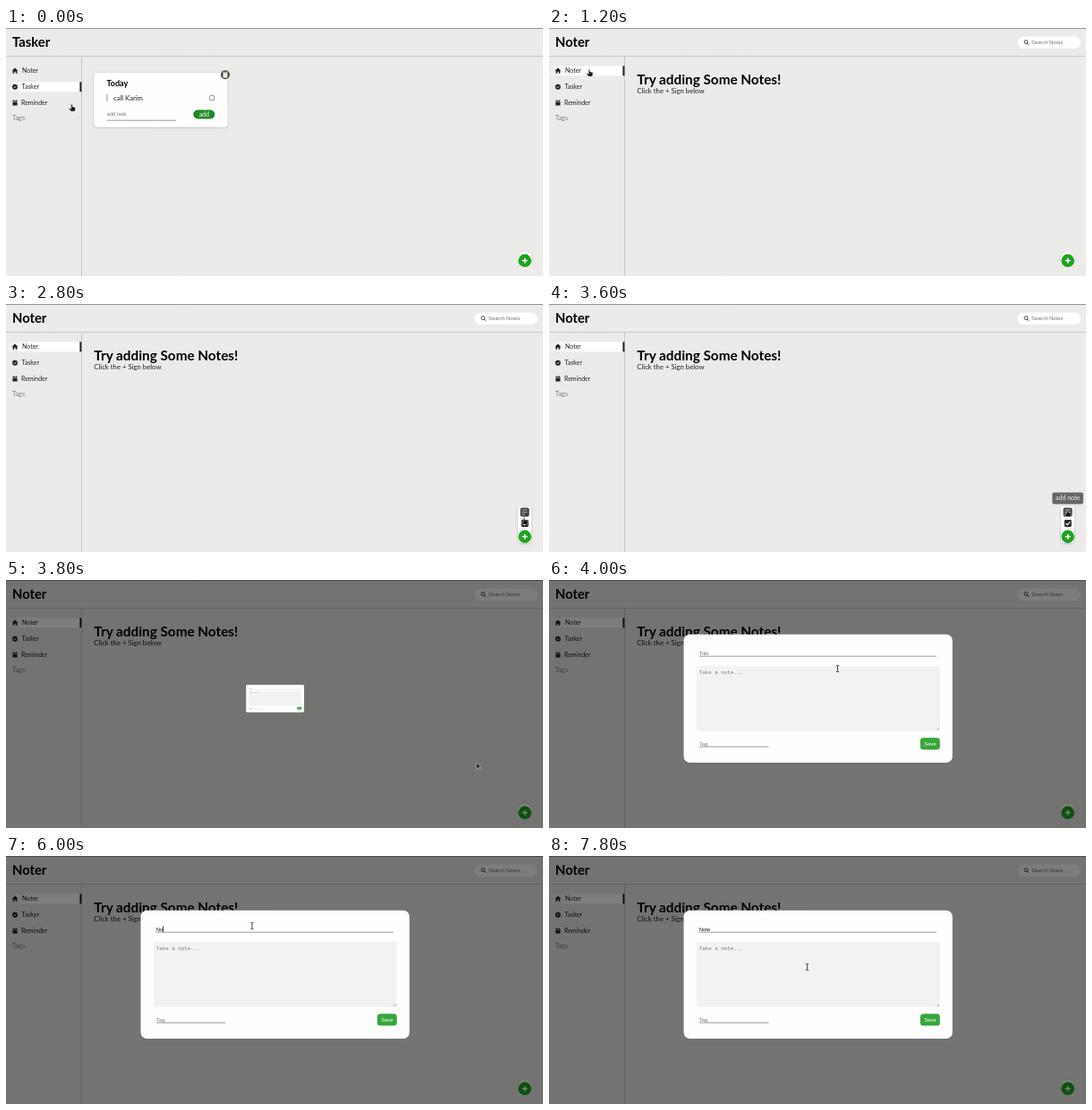
An HTML page that plays this animation: 600x277 px, repeating every 8 s.

```html
<!DOCTYPE html>
<html lang="en">
<head>
<meta charset="utf-8">
<title>Notes app</title>
<style>
  html, body { margin: 0; width: 100%; height: 100%; overflow: hidden; background: #ebebe9; }
  svg { display: block; width: 100%; height: 100%; }
  text { font: 7px Lato, sans-serif; fill: #222; white-space: pre; }
  .h1 { font-size: 14.8px; font-weight: 700; fill: #000; }
  .field { font: 5.83px "Liberation Sans", Arial, sans-serif; fill: #757575; }
  .mono { font: 5.83px "Liberation Mono", monospace; fill: #757575; }
  .light { fill: #fff; }
  .mid { text-anchor: middle; }
</style>
</head>
<body>
<svg viewBox="0 0 600 277">
  <defs>
    <linearGradient id="bg">
      <stop offset="0" stop-color="#e9ece9"/><stop offset=".5" stop-color="#ebebe9"/><stop offset="1" stop-color="#ecebe9"/>
    </linearGradient>
    <linearGradient id="row">
      <stop offset="0" stop-color="#fff" stop-opacity=".1"/><stop offset=".3" stop-color="#fff"/>
    </linearGradient>
    <filter id="shade" x="-30%" y="-30%" width="160%" height="160%">
      <feDropShadow dx="0" dy=".6" stdDeviation="1.2" flood-opacity=".25"/>
    </filter>
  </defs>

  <rect width="600" height="277" fill="url(#bg)"/>
  <rect width="600" height="1" fill="#929491"/>
  <path d="M0 31.5H600M84.5 31.5V277" stroke="#c9cac8"/>
  <text id="heading" class="h1" x="7" y="21"></text>

  <g id="active">
    <rect y="-5.5" width="83" height="11" fill="url(#row)"/>
    <rect x="82.4" y="-5.5" width="2" height="11" fill="#222"/>
  </g>
  <g fill="#222">
    <path d="M6.6 47.8L10 44.6 13.4 47.8H12.4V50.8H10.8V48.7H9.2V50.8H7.6V47.8Z"/>
    <circle cx="10" cy="65.7" r="3"/>
    <path d="M8.5 65.8L9.6 66.9 11.6 64.7" fill="none" stroke="#fff" stroke-width=".8"/>
    <path d="M7.4 81.2H8.2V80.3H9V81.2H11V80.3H11.8V81.2H12.6V82.3H7.4ZM7.4 82.8H12.6V86.4H7.4Z"/>
  </g>
  <text x="18" y="50.2">Noter</text>
  <text x="17.5" y="68.2">Tasker</text>
  <text x="17" y="86">Reminder</text>
  <text x="7" y="102.7" style="fill:#7b7c7a;font-size:7.3px">Tags</text>

  <g id="tasks">
    <rect x="98.5" y="50" width="149" height="60.5" rx="4" fill="#fefefd" filter="url(#shade)"/>
    <text x="112.5" y="64.6" style="font-size:9px;font-weight:700;fill:#000">Today</text>
    <path d="M113 74V82.5" stroke="#888" stroke-width=".9"/>
    <text x="120" y="80.6" style="font-size:7.7px">call Karim</text>
    <rect x="227.6" y="75.6" width="5" height="5" rx=".8" fill="#fff" stroke="#777" stroke-width=".8"/>
    <text class="field" x="112.5" y="98.2">add task</text>
    <path d="M112.5 103.2H190" stroke="#858585" stroke-width=".8"/>
    <rect x="209.3" y="91.6" width="24" height="9.8" rx="4.9" fill="#1f8b22"/>
    <text class="light mid" x="221.3" y="98.6">add</text>
    <circle cx="245" cy="52.3" r="5" fill="#484936"/>
    <path d="M242.9 50.2H247.1V55.2H242.9ZM242.4 49.3H247.6" fill="#f0efdc" stroke="#f0efdc" stroke-width=".7"/>
  </g>

  <g id="notes">
    <rect x="523.5" y="9.5" width="70.5" height="13.5" rx="6.75" fill="#fefefe"/>
    <circle cx="533" cy="15.6" r="1.9" fill="none" stroke="#333" stroke-width=".9"/>
    <path d="M534.4 17L536.2 18.8" stroke="#333"/>
    <text class="field" x="539" y="18.2">Search Notes</text>
    <text class="h1" x="98.3" y="63.2" style="font-size:15.3px">Try adding Some Notes!</text>
    <text x="98.3" y="73.2" style="font-size:7.75px">Click the + Sign below</text>
  </g>

  <g id="menu">
    <rect x="572" y="226" width="15" height="41" rx="4" fill="#fff" filter="url(#shade)"/>
    <rect x="574.6" y="227.6" width="10" height="10" rx="2" fill="#444"/>
    <path d="M576.5 230H582.5M576.5 232.5H582.5M576.5 235H580" stroke="#ddd" stroke-width=".7"/>
    <rect x="575.8" y="241" width="8" height="8" rx="1.4" fill="#2b2b2b"/>
    <path d="M577.4 245L579.2 246.8 582.2 243.3" fill="none" stroke="#fff" stroke-width="1.1"/>
  </g>
  <g id="tip">
    <rect x="562.3" y="210.6" width="34.6" height="13" rx="2" fill="#666"/>
    <text class="mid" x="579.6" y="219.2" style="fill:#f0f0f0">add note</text>
  </g>
  <circle cx="579.7" cy="257.2" r="7.7" fill="#fff" filter="url(#shade)"/>
  <circle cx="579.7" cy="259.8" r="7.2" fill="#1ba51b"/>
  <path d="M576.8 259.8H582.6M579.7 256.9V262.7" stroke="#fff" stroke-width="1.5"/>

  <rect id="dim" width="600" height="277" fill="#000" opacity=".51"/>
  <g id="modal">
    <rect x="150.5" y="60.8" width="300.3" height="143.2" rx="7" fill="#fefefd"/>
    <text id="title" class="field" x="167.8" y="83.7"></text>
    <path d="M168 85.2H433M168 186.2H245.5" stroke="#858585" stroke-width=".8"/>
    <rect x="164.8" y="96.2" width="272" height="72.6" rx="1" fill="#f2f2f0"/>
    <path d="M433.2 167.8L436 165M435 167.8L436 166.8" stroke="#777" stroke-width=".5"/>
    <text class="mono" x="167.8" y="104.6">Take a note...</text>
    <text class="field" x="167.8" y="184.8">Tag</text>
    <rect x="414.8" y="176.2" width="22" height="13.2" rx="3.5" fill="#36a63a"/>
    <text class="field light mid" x="425.8" y="185">Save</text>
    <rect id="caret" width=".8" height="6.6" fill="#111"/>
  </g>

  <g id="arrow"><path d="M0 0V7L1.6 5.6 2.7 8 3.8 7.5 2.7 5.2H4.9Z" fill="#111" stroke="#eee" stroke-width=".5"/></g>
  <g id="hand"><path d="M-.7 .6Q0-.3 .7 .6V3L3.4 3.6Q4.1 3.8 4 4.8L3.4 8H-1L-3 5.2Q-2.8 4.2-1.7 4.8L-.7 5.4Z" fill="#111" stroke="#eee" stroke-width=".4"/></g>
  <g id="beam"><path d="M-1.6-3.6Q0-3.7 0-2.8Q0-3.7 1.6-3.6M0-2.8V2.8M-1.6 3.6Q0 3.7 0 2.8Q0 3.7 1.6 3.6" fill="none" stroke="#333" stroke-width=".9"/></g>
</svg>
<script>
const LOOP = 8000, STEP = 200;
const $ = id => document.getElementById(id);
const show = (id, on) => { $(id).style.display = on ? '' : 'none'; };
const within = (t, a, b) => t >= a && t < b;

// time, x, y, pointer shape from that time on
const path = [
  [0, 73.5, 85, 'hand'], [800, 45, 46, 'hand'], [1200, 45, 46, 'hand'],
  [1400, 105, 72, 'arrow'], [1800, 400, 180, 'arrow'], [2000, 527.7, 232.5, 'arrow'],
  [2200, 579, 256, 'hand'], [2400, 579, 256, 'hand'], [3000, 579, 229.5, 'hand'],
  [3600, 579, 229.5, 'hand'], [3800, 525.7, 204, 'arrow'], [4000, 322.5, 99, 'beam'],
  [4600, 275, 78, 'beam'], [6600, 275, 78, 'beam'], [7400, 288.4, 124, 'beam'], [LOOP, 288.4, 124, 'beam']
];

function movePointer(t) {
  const i = path.findIndex(p => p[0] > t);
  const [t0, x0, y0, shape] = path[i - 1], [t1, x1, y1] = path[i];
  const k = (t - t0) / (t1 - t0);
  for (const id of ['arrow', 'hand', 'beam']) show(id, id === shape);
  $(shape).setAttribute('transform', `translate(${x0 + (x1 - x0) * k} ${y0 + (y1 - y0) * k})`);
}

function drawModal(t) {
  const open = t >= 3800;
  show('dim', open);
  show('modal', open);
  if (!open) return;
  const scale = Math.min(1, 0.216 + (t - 3800) / STEP * 0.784);
  $('modal').setAttribute('transform', `translate(300.6 132.4) scale(${scale}) translate(-300.6 -132.4)`);

  const typed = 'Note'.slice(0, Math.max(0, (t - 5600) / STEP));
  const title = $('title'), caret = $('caret');
  title.textContent = typed || 'Title';
  title.style.fill = typed ? '#111' : '';
  const inNote = t >= 7200;
  show('caret', within(t, 4800, 5400) || within(t, 5800, 7800));
  caret.setAttribute('x', 167.8 + (typed && !inNote ? title.getComputedTextLength() : 0));
  caret.setAttribute('y', inNote ? 99.2 : 78.4);
}

function frame(now) {
  const t = Math.floor(now % LOOP / STEP) * STEP;
  const onNotes = t >= 1200;
  $('heading').textContent = onNotes ? 'Noter' : 'Tasker';
  $('active').setAttribute('transform', `translate(0 ${onNotes ? 47.8 : 65.7})`);
  show('tasks', !onNotes);
  show('notes', onNotes);
  show('menu', within(t, 2400, 3800));
  show('tip', within(t, 3000, 3800));
  drawModal(t);
  movePointer(t);
}

const start = performance.now();
function tick() {
  frame(performance.now() - start);
  requestAnimationFrame(tick);
}
tick();
</script>
</body>
</html>
```
